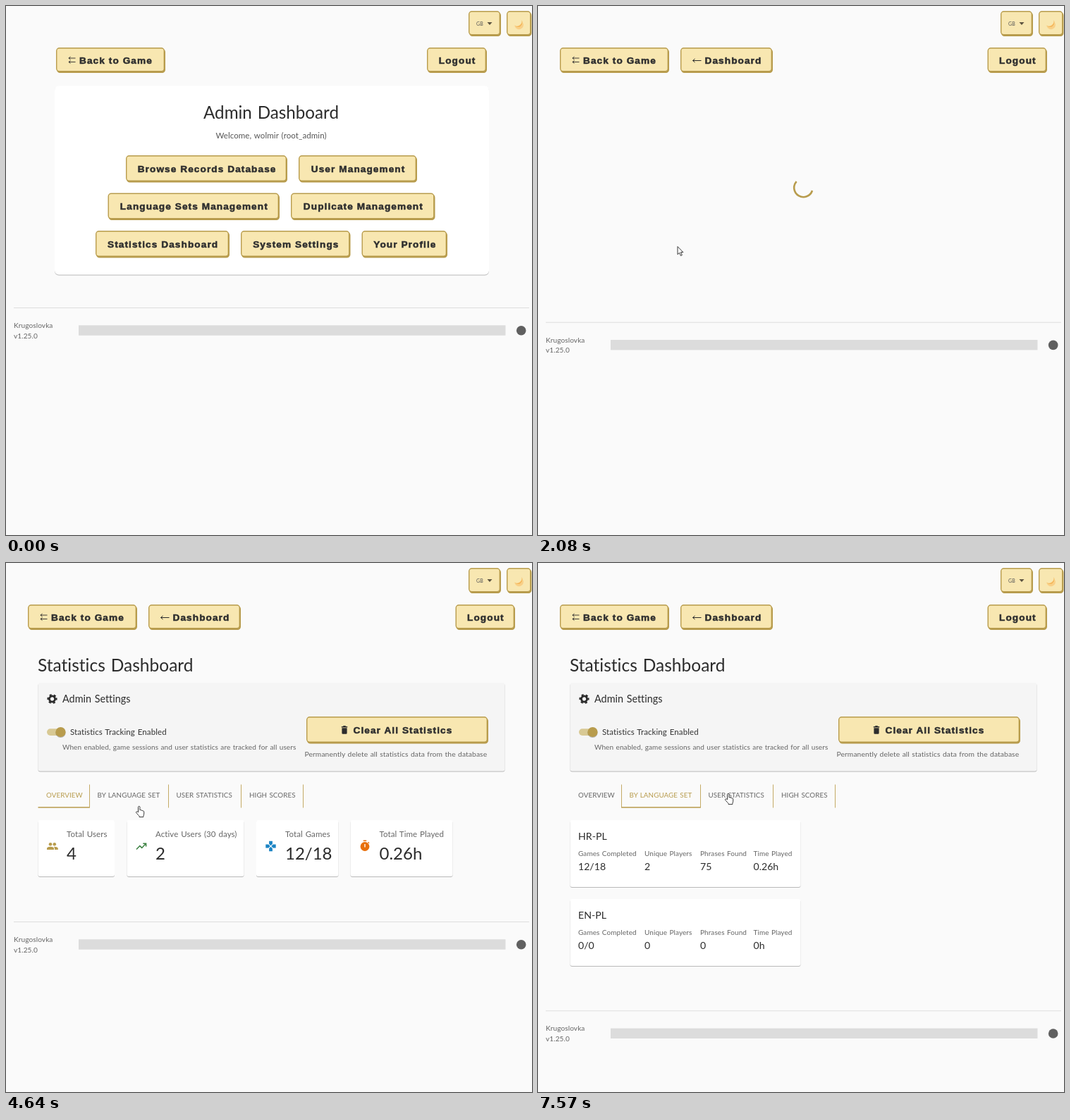
Recreate the animation shown at these times as an HTML page. Size 746 by 751 pixels, loop 8 s.

```html
<!DOCTYPE html>
<html lang="en">
<head>
<meta charset="utf-8">
<title>Admin dashboard</title>
<style>
html, body { margin: 0; width: 100%; height: 100%; overflow: hidden; background: #fafafa; }
svg { display: block; width: 746px; height: 751px; }
text { font-family: Lato, "Open Sans", sans-serif; font-variant-ligatures: none; word-spacing: .07em; white-space: pre; }
.small { letter-spacing: .008em; }
.label { font: bold 13.6px "Liberation Sans", Arial, sans-serif; letter-spacing: 1.1px; word-spacing: 0;
  fill: #2f2f2f; stroke: #2f2f2f; stroke-width: .55px; }
.card { filter: drop-shadow(0 1px .7px rgba(0,0,0,.26)); }
</style>
</head>
<body>
<svg id="stage" viewBox="0 0 746 751"></svg>
<script>
const LOOP = 8000;
const GOLD = '#b89c4d', CREAM = '#f8e7b1', HOVER = '#edd694', INK = '#2c2c2c', GREY = '#666';
const stage = document.getElementById('stage');

const text = (x, y, size, str, fill = INK, anchor = 'start') =>
  `<text class="${size < 13 ? 'small' : ''}" x="${x}" y="${y}" font-size="${size}" fill="${fill}" text-anchor="${anchor}">${str}</text>`;
const line = (d, color, width = 1) =>
  `<path d="${d}" fill="none" stroke="${color}" stroke-width="${width}"/>`;
const shape = (d, color) => `<path d="${d}" fill="${color}"/>`;
const card = (x, y, w, h, fill = '#fff', r = 3.5) =>
  `<rect class="card" x="${x}" y="${y}" width="${w}" height="${h}" rx="${r}" fill="${fill}"/>`;
const group = (id, body) => `<g id="${id}">${body}</g>`;

function box(x, y, w, h) {
  const rect = (dx, dy, fill) =>
    `<rect x="${x + .7 + dx}" y="${y + .7 + dy}" width="${w - 2.4}" height="${h - 3}" rx="4" fill="${fill}" stroke="${GOLD}" stroke-width="1.4"/>`;
  return rect(1, 1.7, GOLD) + rect(0, 0, CREAM);
}
// Without a label position the label is centred.
function button(x, y, w, h, label, lx) {
  const anchor = lx ? 'start' : 'middle';
  return box(x, y, w, h) +
    `<text class="label" x="${lx || x + w / 2 + .6}" y="${y + h / 2 + 4.5}" text-anchor="${anchor}">${label}</text>`;
}
const backButton = x => button(x, 59, 155, 36, 'Back to Game', x + 33) +
  line(`M${x + 18} 74h9.5M${x + 18} 79.5h9.5M${x + 20.5} 72l-2.6 2 2.6 2M${x + 20.5} 77.5l-2.6 2 2.6 2`, INK, .9);

const topBar = box(656, 7, 46, 36) + text(667, 28, 7, 'GB', '#555') + shape('M682.5 23h7l-3.5 4z', '#5c5340') +
  box(710, 7, 35.5, 36) +
  shape('M731.5 20a6.5 6.5 0 1 1-10.8 7.5 7.2 7.2 0 0 0 10.8-7.5z', '#f5b95f') +
  shape('M733.5 24a6.5 6.5 0 0 1-12 5.2 8 8 0 0 0 12-5.2z', '#f9cf86');

const dash = backButton(71) + button(597, 59, 85, 36, 'Logout') +
  card(69, 113.5, 616, 268, '#fff', 6) +
  text(376, 159.5, 24.2, 'Admin Dashboard', INK, 'middle') +
  text(376, 188, 11.5, 'Welcome, wolmir (root_admin)', '#555', 'middle') +
  button(170, 212, 229, 38.5, 'Browse Records Database') +
  button(415, 212, 168, 38.5, 'User Management') +
  button(144.5, 265.5, 243.5, 38.5, 'Language Sets Management') +
  button(404, 265.5, 204.5, 38.5, 'Duplicate Management') +
  group('statBtn', button(127, 319, 190, 38.5, 'Statistics Dashboard')) +
  button(333, 319, 155.5, 38.5, 'System Settings') +
  button(504.5, 319, 121.5, 38.5, 'Your Profile');

const inner = backButton(31) + button(202, 59, 131, 36, 'Dashboard', 236.5) +
  line('M219.5 77.5h12M222.5 75l-3 2.5 3 2.5', INK, 1) + button(637.5, 59, 84.5, 36, 'Logout');

const gear = `<g fill="none" stroke="${INK}" transform="rotate(-15 65.5 193)">
  <circle cx="65.5" cy="193" r="4" stroke-width="2.8"/>
  <circle cx="65.5" cy="193" r="6" stroke-width="2.2" stroke-dasharray="3.14"/></g>`;

const tabs = [['OVERVIEW', 57], ['BY LANGUAGE SET', 129.5], ['USER STATISTICS', 241.5], ['HIGH SCORES', 345]];
const stats = text(45, 154, 24.5, 'Statistics Dashboard') + card(45.5, 170, 662, 125.5, '#f5f5f5', 3) +
  gear + text(80, 198, 14.4, 'Admin Settings') +
  '<rect x="58" y="235.3" width="25" height="9.6" rx="4.8" fill="#d8c994"/>' +
  `<circle class="card" cx="77.5" cy="240" r="7.1" fill="${GOLD}"/>` +
  text(91, 243.5, 11.5, 'Statistics Tracking Enabled', '#333') +
  text(80, 264.5, 10.05, 'When enabled, game sessions and user statistics are tracked for all users', GREY) +
  button(426, 218, 258, 38.5, 'Clear All Statistics', 492.5) +
  shape('M475.8 232h2l.8-1h2.8l.8 1h2v1.4h-8.4zM476.4 234.2h7.2v7.3q0 1.3-1.3 1.3h-4.6q-1.3 0-1.3-1.3z', INK) +
  text(423.5, 274.5, 10.3, 'Permanently delete all statistics data from the database', GREY) +
  tabs.map(([name, x], i) => group('tab' + i, text(x, 333, 9.8, name, 'inherit'))).join('') +
  line('M118.5 314.5v33M230.5 314.5v33M333.5 314.5v33M421.5 314.5v33', '#c4ab66') +
  `<rect id="mark" y="346.2" height="1.5" fill="${GOLD}"/>`;

const metric = (x, w, tx, label, value) =>
  card(x, 365, w, 80, '#fff', 3) + text(tx, 388.5, 11.5, label, GREY) + text(tx, 420.5, 24, value);
const petal = a => `<path transform="rotate(${a} 375.5 402)" d="M373.1 394.8h4.8v4l-2.4 2.4-2.4-2.4z" fill="#1b84c4"/>`;
const overview =
  metric(45.5, 108.5, 86, 'Total Users', '4') +
  metric(171.5, 166, 212, 'Active Users (30 days)', '2') +
  metric(355, 116.5, 396, 'Total Games', '12/18') +
  metric(488.5, 145, 529.5, 'Total Time Played', '0.26h') +
  `<g fill="${GOLD}"><circle cx="63" cy="399.3" r="2.3"/><circle cx="68.8" cy="399.3" r="2.3"/>
   <path d="M58 407v-1.6q0-2.6 5-2.6t5 2.6v1.6zM69 407v-1.6q0-1.6-1.4-2.6 6.2-.2 6.2 2.6v1.6z"/></g>` +
  line('M185 406.5l4.8-4.9 2.9 2.8 5.3-5.6M194.3 398.2h4.3v4.3', '#3a8040', 1.5) +
  [0, 90, 180, 270].map(petal).join('') +
  '<circle cx="509" cy="402.5" r="6.4" fill="#e8700c"/>' +
  shape('M506.8 393.6h4.4v1.5h-4.4zM513 396.8l1-1 1.4 1.4-1 1z', '#e8700c') + line('M509 399v4.4', '#fff', 1.4);

const columns = [57, 151, 230, 305.5];
const heads = ['Games Completed', 'Unique Players', 'Phrases Found', 'Time Played'];
const langCard = (y, name, values) => card(45.5, y, 327, 95, '#fff', 3) + text(57, y + 28, 14.2, name) +
  columns.map((x, i) => text(x, y + 50.5, 10, heads[i], GREY) + text(x, y + 71, 14.1, values[i])).join('');
const langs = langCard(365, 'HR-PL', ['12/18', '2', '75', '0.26h']) +
  langCard(477, 'EN-PL', ['0/0', '0', '0', '0h']);

const footer = line('M11 .5h731', '#dedede') +
  text(11, 29, 10.1, 'Krugoslovka', GREY) + text(11, 43.5, 10.1, 'v1.25.0', GREY) +
  '<rect x="103" y="25.3" width="605.5" height="14.4" fill="#dcdcdc"/>' +
  '<circle cx="730.7" cy="32.7" r="6.8" fill="#606060"/>';

const pointer = `<g fill="#fff" stroke="#222" stroke-width=".9" stroke-linejoin="round">
  <path id="arrow" d="M0 0v11.2l2.6-2.4 1.8 4.2 1.9-.8-1.8-4.1h3.4z"/>
  <path id="hand" transform="translate(-4.7 0)" d="M3.5 8.8V1.6a1.2 1.2 0 0 1 2.4 0v4.2c.6-.6 1.8-.4 2 .5.7-.4 1.7-.1 1.9.7.8-.3 1.9.1 1.9 1.2v3c0 1.5-.9 2-.9 3.4v1H5.1v-1C4.4 13.4 2 11.2.6 9.4 0 8.3 1.6 7.4 2.4 8.2z"/></g>`;

stage.innerHTML = topBar + group('dash', dash) +
  group('inner', inner + `<path id="spin" fill="none" stroke="${GOLD}" stroke-width="2.6"/>`) +
  group('stats', stats) + group('overview', overview) + group('langs', langs) +
  group('footer', footer) + group('pointer', pointer);

const $ = id => document.getElementById(id);
const show = (id, on) => $(id).setAttribute('display', on ? 'inline' : 'none');
const clamp = v => Math.min(1, Math.max(0, v));
const ease = v => v * v * (3 - 2 * v);

const LOAD = 1270, READY = 2170, SWITCH = 5180;
// time, pointer tip x, y
const path = [
  [190, 83, 721], [280, 96, 668], [460, 145, 500], [640, 186, 372], [820, 197, 346], [1090, 198.7, 341.5],
  [1270, 198, 341.5], [3200, 198, 341.5], [3290, 200.7, 342.5], [3470, 257, 400], [3650, 257, 400],
  [4000, 226, 396], [4370, 192, 389], [4550, 189, 360], [4640, 188.7, 345], [4910, 188.7, 338.5],
  [5090, 188.7, 338], [7120, 188.7, 338], [7390, 240, 334], [7570, 269.7, 327]
];
function pointerAt(t) {
  const i = path.findIndex(k => k[0] > t);
  if (i < 0) return path[path.length - 1].slice(1);
  const a = path[Math.max(0, i - 1)], b = path[i];
  const k = clamp((t - a[0]) / (b[0] - a[0] || 1));
  return [a[1] + (b[1] - a[1]) * k, a[2] + (b[2] - a[2]) * k];
}

// Indeterminate ring: the arc grows, then its tail catches up while it turns.
function ring(t) {
  const p = (t - 1216) / 1400 % 1, full = 126.9;
  const grow = ease(clamp(p * 2)), chase = Math.pow(clamp(p * 2 - 1), .7);
  const tail = 15 * grow + 110 * chase;
  const len = Math.min(1 + 99 * grow, full - tail);
  const at = u => {
    const a = (u / full + p) * 2 * Math.PI;
    return `${376.4 + 13.2 * Math.cos(a)} ${258 + 13.2 * Math.sin(a)}`;
  };
  return `M${at(tail)}A13.2 13.2 0 ${len > full / 2 ? 1 : 0} 1 ${at(tail + len)}`;
}

function render(t) {
  const onDash = t < LOAD, loading = !onDash && t < READY, lang = t >= SWITCH;
  show('dash', onDash);
  show('inner', !onDash);
  show('spin', loading);
  show('stats', t >= READY);
  show('overview', t >= READY && !lang);
  show('langs', lang);
  if (loading) $('spin').setAttribute('d', ring(t));
  $('footer').setAttribute('transform', `translate(0 ${onDash ? 428 : loading ? 448.7 : lang ? 635.3 : 509})`);

  const [x, y] = pointerAt(t);
  const onButton = onDash && y < 356 && x > 127;
  const hand = onButton || (t >= READY && y < 347.5);
  show('pointer', t >= 190);
  show('hand', hand);
  show('arrow', !hand);
  $('pointer').setAttribute('transform', `translate(${x} ${y})`);

  const [shade, face] = $('statBtn').children;
  shade.setAttribute('transform', onButton ? 'translate(-1 -.7)' : '');
  face.setAttribute('fill', onButton ? HOVER : CREAM);
  $('statBtn').setAttribute('transform', onButton ? 'translate(0 .8)' : '');

  const slide = ease(clamp((t - SWITCH) / 450));
  $('mark').setAttribute('x', 45.5 + 73 * slide);
  $('mark').setAttribute('width', 73 + 39 * slide);
  tabs.forEach((_, i) => {
    $('tab' + i).setAttribute('fill', i === (lang ? 1 : 0) ? GOLD : GREY);
  });
}

let start;
function frame(now) {
  if (start === undefined) start = now;
  render((now - start) % LOOP);
  requestAnimationFrame(frame);
}
render(0);
requestAnimationFrame(frame);
</script>
</body>
</html>
```
